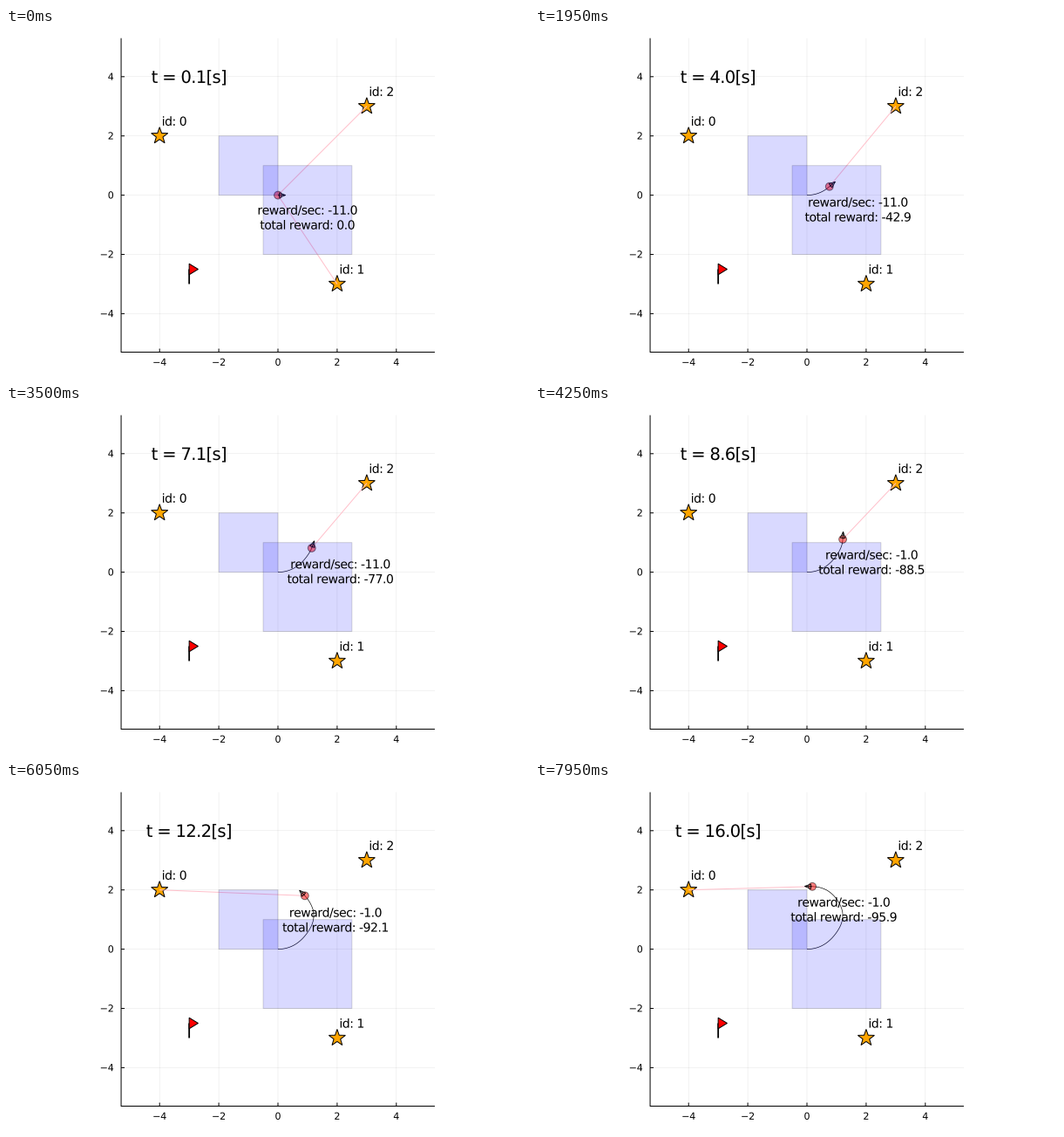
Recreate the animation shown at these times as a matplotlib script. Size 600 px wide and 400 px high, loop 8000 ms.

```python
import math
import numpy as np
import matplotlib.pyplot as plt
from matplotlib.animation import FuncAnimation
from matplotlib.patches import Circle, PathPatch, Polygon, Rectangle
from matplotlib.path import Path
from matplotlib.textpath import TextPath

W, H, DPI = 600, 400, 100
CX, CY, UNIT = 312.0, 191.6, 33.95
FRAMES, DT = 160, 0.1
SMALL, MEDIUM, LARGE = (pt * DPI / 72 for pt in (8, 10.1, 14.1))
TRACKING = -0.035
FONT = "DejaVu Sans"
STARS = [(-4, 2), (2, -3), (3, 3)]
PUDDLES = [(-2, 0, 2, 2), (-0.5, -2, 3, 3)]
PUDDLE_STEPS = 80

plt.rcParams["path.snap"] = False
fig = plt.figure(figsize=(W / DPI, H / DPI), dpi=DPI, facecolor="white")
ax = fig.add_axes([0, 0, 1, 1])
ax.set_xlim(0, W)
ax.set_ylim(H, 0)
ax.axis("off")


def px(x, y):
    return CX + UNIT * x, CY - UNIT * y


def line(xs, ys, width=1.0, color="black", z=1, **kw):
    kw.setdefault("solid_capstyle", "butt")
    return ax.plot(xs, ys, color=color, lw=width * 72 / DPI, zorder=z, **kw)[0]


# ---- text -----------------------------------------------------------
EM = 100
BAR = TextPath((0, 0), "|", size=EM, prop=FONT).vertices[:, 0].max()
glyphs = {}


def glyph(ch):
    """Outline, path codes and advance of one character, in em."""
    if ch not in glyphs:
        probe = TextPath((0, 0), ch + "|", size=EM, prop=FONT)
        advance = (probe.vertices[:, 0].max() - BAR) / EM
        if ch == " ":
            glyphs[ch] = (np.empty((0, 2)), np.empty(0, np.uint8), advance)
        else:
            p = TextPath((0, 0), ch, size=EM, prop=FONT)
            glyphs[ch] = (p.vertices / EM, p.codes, advance)
    return glyphs[ch]


def text_path(s, x, y, size, align=0.5, tracking=TRACKING):
    pen, verts, codes = 0.0, [], []
    for ch in s:
        v, c, advance = glyph(ch)
        verts.append(v + [pen, 0])
        codes.append(c)
        pen += advance + tracking
    width = pen - tracking
    v = np.concatenate(verts) - [align * width, 0.364]
    return Path(v * [size, -size] + [x, y], np.concatenate(codes))


def label(s, x, y, size, **kw):
    patch = PathPatch(text_path(s, x, y, size, **kw), fc="black", lw=0, zorder=9)
    return ax.add_patch(patch)


# ---- motion ---------------------------------------------------------
KNOTS = [0.1, 2.3, 5.7, 8.6, 10.9, 13.5, 16.0]


def track(points, headings, speed):
    """Smooth path through poses; returns positions and headings per step."""
    p = np.array(points, float)
    a = np.radians(headings)
    m = speed * np.column_stack([np.cos(a), np.sin(a)])
    pos, ang = [], []
    for k in range(FRAMES):
        t = DT * (k + 1)
        i = min(max(int(np.searchsorted(KNOTS, t)) - 1, 0), len(KNOTS) - 2)
        h = KNOTS[i + 1] - KNOTS[i]
        u = (t - KNOTS[i]) / h
        pos.append((2*u**3 - 3*u**2 + 1) * p[i] + (3*u**2 - 2*u**3) * p[i + 1]
                   + h * ((u**3 - 2*u**2 + u) * m[i] + (u**3 - u**2) * m[i + 1]))
        ang.append(a[i] + u * (a[i + 1] - a[i]))
    return np.array(pos), np.array(ang)


robot, heading = track(
    [(0, 0), (0.456, 0.094), (1.0, 0.565), (1.21, 1.11),
     (1.075, 1.58), (0.69, 1.98), (0.18, 2.115)],
    [0, 23.5, 55, 87, 120, 149, 178], 0.214)
estimate, _ = track(
    [(0, 0), (0.43, 0.09), (0.97, 0.515), (1.19, 1.09),
     (1.10, 1.53), (0.75, 1.91), (0.25, 2.09)],
    [0, 23, 53, 84, 117, 145, 174], 0.205)


def visible(k, star):
    dx, dy = np.subtract(star, robot[k])
    turn = math.remainder(math.atan2(dy, dx) - heading[k], 2 * math.pi)
    return abs(turn) <= math.pi / 3 and 0.5 <= math.hypot(dx, dy) <= 6


# ---- fixed parts ----------------------------------------------------
LEFT, BOTTOM = px(-5.3, -5.3)
RIGHT, TOP = px(5.3, 5.3)
for v in range(-4, 5, 2):
    gx, gy = px(v, v)
    line([gx, gx], [TOP, BOTTOM], 0.5, alpha=0.1, z=0)
    line([LEFT, RIGHT], [gy, gy], 0.5, alpha=0.1, z=0)
    line([gx, gx], [BOTTOM, BOTTOM - 4])
    line([LEFT, LEFT + 4], [gy, gy])
    name = str(v).replace("-", "\u2212")
    label(name, gx, 382.8, SMALL, tracking=-0.02)
    label(name, 123.8, gy - 0.2, SMALL, align=1, tracking=-0.02)
line([LEFT, LEFT, RIGHT], [TOP, BOTTOM, BOTTOM])

for x, y, w, h in PUDDLES:
    corner = px(x, y + h)
    ax.add_patch(Rectangle(corner, w * UNIT, h * UNIT, fc=(0, 0, 1, 0.15),
                           ec=(0, 0, 0, 0.15), lw=0.72, zorder=5))

for i, (x, y) in enumerate(STARS):
    sx, sy = px(x, y)
    pts = [(sx + r * math.sin(j * math.pi / 5), sy - r * math.cos(j * math.pi / 5))
           for j, r in enumerate([10, 4] * 5)]
    ax.add_patch(Polygon(pts, fc="orange", ec="black", lw=0.72, zorder=1))
    label(f"id: {i}", *px(x + 0.5, y + 0.5), MEDIUM)

fx, fy = px(-3, -2.5)
line([fx, fx], [fy, fy + 0.5 * UNIT], 1.8, z=6)
ax.add_patch(Polygon([(fx, fy - 6.3), (fx + 10.3, fy), (fx, fy + 6.3)],
                     fc="red", ec="black", lw=0.72, zorder=7))

# ---- moving parts ---------------------------------------------------
trail = line([], [], 0.65, z=2)
rays = [line([], [], 1.0, color="pink", z=3) for _ in STARS]
body = ax.add_patch(Circle((0, 0), 4.4, fc=(1, 0, 0, 0.5), ec=(0, 0, 0, 0.5),
                           lw=0.72, zorder=4))
shaft = line([], [], 0.8, z=4)
head = ax.add_patch(Polygon([(0, 0)] * 3, fc=(0, 0, 0, 0.1), ec="black",
                            lw=0.6, zorder=4))
clock, rate_text, total_text = (label("0", 0, 0, MEDIUM) for _ in range(3))


def update(k):
    x, y = px(*robot[k])
    trail.set_data(*px(*robot[:k + 1].T))
    for ray, star in zip(rays, STARS):
        sx, sy = px(*star)
        ray.set_data([x, sx], [y, sy])
        ray.set_visible(visible(k, star))

    body.center = (x, y)
    c, s = math.cos(heading[k]), -math.sin(heading[k])
    shaft.set_data([x, x + 8.5 * c], [y, y + 8.5 * s])
    head.set_xy([(x + a * c - b * s, y + a * s + b * c)
                 for a, b in [(8.7, 0), (1.6, 2.8), (1.6, -2.8)]])

    rate = -11.0 if k < PUDDLE_STEPS else -1.0
    total = -(k * DT + 10 * DT * min(k, PUDDLE_STEPS)) if k else 0.0
    ex, ey = estimate[k]
    clock.set_path(text_path(f"t = {DT * (k + 1):.1f}[s]", *px(-3, 4), LARGE))
    rate_text.set_path(text_path(f"reward/sec: {rate:.1f}",
                                 *px(ex + 1, ey - 0.5), MEDIUM))
    total_text.set_path(text_path(f"total reward: {total:.1f}",
                                  *px(ex + 1, ey - 1), MEDIUM))
    return trail, *rays, body, shaft, head, clock, rate_text, total_text


anim = FuncAnimation(fig, update, frames=FRAMES, interval=50,
                     repeat=True, repeat_delay=0, blit=False)
plt.show()
```
